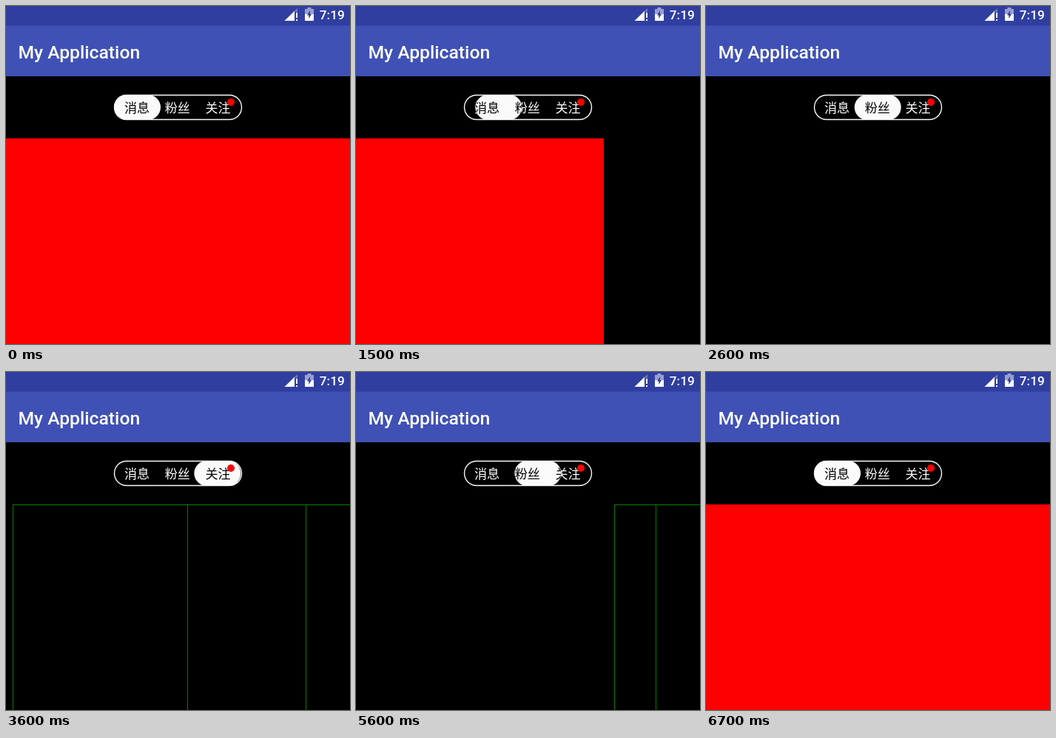
An HTML page with a canvas that plays this animation: 465x457 px, repeating every 7.2 s.

```html
<!DOCTYPE html>
<html lang="zh-CN">
<head>
<meta charset="utf-8">
<title>Segmented pager</title>
<style>
html, body { margin: 0; width: 100%; height: 100%; overflow: hidden; background: #000; }
canvas { display: block; }
</style>
</head>
<body>
<canvas id="stage" width="465" height="457"></canvas>
<script>
const W = 465, H = 457, LOOP = 7200, STEP = 100;
const BAR = '#303f9f', APP = '#3f51b5', WHITE = '#fafafa', RED = '#f00', GREEN = '#008000';
const PAGE_TOP = 179, TAB_GAP = 54.7;
const LABELS = ['消息', '粉丝', '关注'];
const ctx = document.getElementById('stage').getContext('2d');

// Each drag continues from the last page position; pow < 1 starts fast, > 1 starts slowly.
const DRAGS = [
  { start: 900, end: 1700, to: .394, pow: 1.2 },
  { start: 1700, end: 2400, to: 1, pow: 1.7 },
  { start: 2600, end: 3100, to: 2, pow: 1 },
  { start: 3500, end: 4100, to: 1.884, pow: 1 },
  { start: 4600, end: 5100, to: 1.4, pow: .27 },
  { start: 5300, end: 6100, to: 1, pow: 1 },
  { start: 6200, end: 6700, to: 0, pow: .8 }
];

function pageAt(ms) {
  const t = Math.floor(ms / STEP) * STEP;
  return DRAGS.reduce((page, { start, end, to, pow }) => {
    const u = Math.min(1, Math.max(0, (t - start) / (end - start)));
    return page + (to - page) * u ** pow;
  }, 0);
}

function rect(color, x, y, w, h) {
  ctx.fillStyle = color;
  ctx.fillRect(x, y, w, h);
}

function poly(color, ...pts) {
  ctx.fillStyle = color;
  ctx.beginPath();
  pts.forEach(([x, y]) => ctx.lineTo(x, y));
  ctx.fill();
}

function text(str, x, y, font, color) {
  ctx.font = font;
  ctx.fillStyle = color;
  ctx.fillText(str, x, y);
}

function pill(x, y, w, h) {
  ctx.beginPath();
  ctx.roundRect(x, y, w, h, h / 2);
}

function drawSignal() {
  poly('rgba(255,255,255,.3)', [390, 7], [394, 3], [394, 8], [390, 8]);
  poly('#fff', [376.5, 20], [390, 6.8], [390, 20]);
  rect('#fff', 392, 9, 2, 7);
  rect('#fff', 392, 18, 2, 2);
}

function drawBattery() {
  const shade = 'rgba(255,255,255,.5)';
  rect(shade, 407.5, 2, 5, 2);
  rect(shade, 404, 4, 12, 7);
  rect('#fff', 404, 11, 12, 9);
  poly(BAR, [411, 6], [407, 12.5], [409.3, 12.5], [409.3, 17], [413, 11], [411, 11]);
}

function drawBars() {
  rect(APP, 0, 0, W, 95);
  rect(BAR, 0, 0, W, 26.5);
  text('My Application', 16.5, 71, '500 24.7px Roboto, sans-serif', '#fff');
  text('7:19', 423.8, 18, '500 17.3px Roboto, sans-serif', '#fff');
  drawSignal();
  drawBattery();
}

function drawPages(page) {
  const edge = Math.round(W * (1 - page));
  if (edge > 0) rect(RED, 0, PAGE_TOP, edge, H - PAGE_TOP);

  const left = Math.round(W * (2 - page));
  if (left >= W) return;
  rect(GREEN, left, PAGE_TOP, W - left, 1);
  for (const x of [left, 245, 405]) {
    if (x >= left) rect(GREEN, x, PAGE_TOP, 1, H - PAGE_TOP);
  }
}

function drawLabels(color) {
  const font = '17px "Noto Sans CJK SC", "Noto Sans CJK", sans-serif';
  LABELS.forEach((str, i) => text(str, 160 + TAB_GAP * i, 143.5, font, color));
}

function drawTabs(page) {
  pill(146.5, 120.5, 172, 33);
  ctx.strokeStyle = WHITE;
  ctx.lineWidth = 1.4;
  ctx.stroke();
  drawLabels('#fff');

  // The label turns black where the thumb covers it.
  ctx.save();
  pill(146 + TAB_GAP * page, 120, 63, 34);
  ctx.fillStyle = WHITE;
  ctx.fill();
  ctx.clip();
  drawLabels('#000');
  ctx.restore();

  ctx.fillStyle = RED;
  ctx.beginPath();
  ctx.arc(304, 130, 5, 0, Math.PI * 2);
  ctx.fill();
}

function draw() {
  const page = pageAt(performance.now() % LOOP);
  rect('#000', 0, 0, W, H);
  drawBars();
  drawPages(page);
  drawTabs(page);
  requestAnimationFrame(draw);
}
draw();
</script>
</body>
</html>
```
